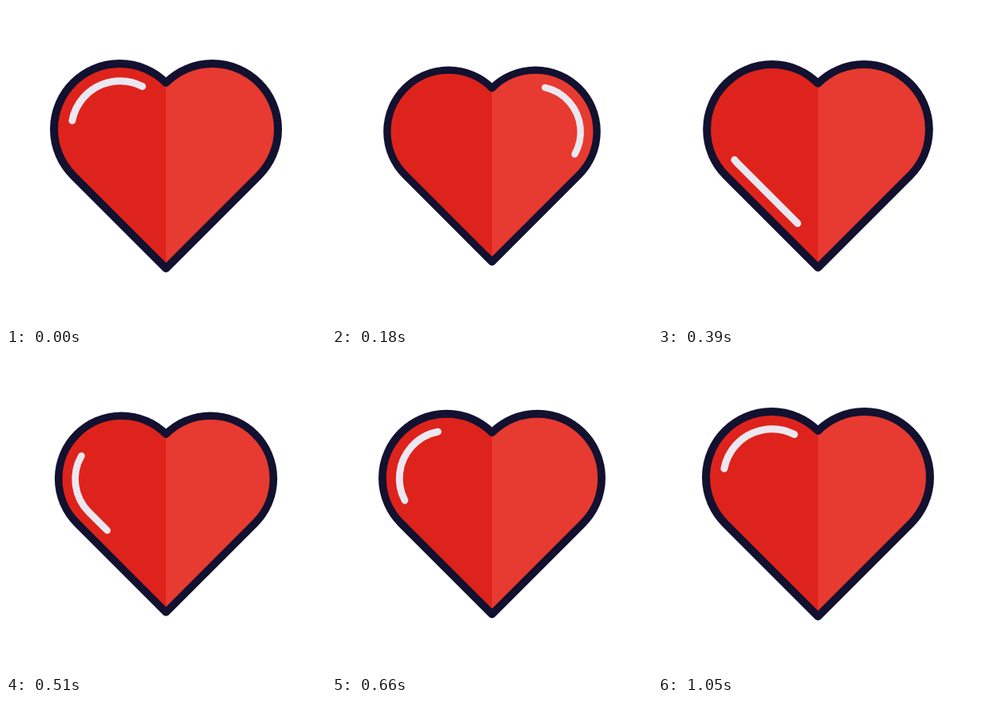
Write an HTML page that moves like this. It is 400x400 px and loops after 2260 ms.

```html
<!DOCTYPE html>
<html lang="en">
<head>
<meta charset="utf-8">
<title>Beating heart</title>
<style>
  html, body { margin: 0; height: 100%; overflow: hidden; background: #fff; }
  svg { display: block; width: 100%; height: 100%; }
  path { stroke-linejoin: round; stroke-linecap: round; }
</style>
</head>
<body>
<svg viewBox="0 0 400 400">
  <g id="heart">
    <path fill="#de231c" d="M200 96A82 82 0 0 0 84 212L200 328Z"/>
    <path fill="#e73a30" d="M200 96A82 82 0 0 1 316 212L200 328Z"/>
    <path fill="none" stroke="#12112f" stroke-width="10"
      d="M200 96A82 82 0 0 0 84 212L200 328L316 212A82 82 0 0 0 200 96Z"/>
    <path id="shine" fill="none" stroke="#ece7f0" stroke-width="9" pathLength="1" stroke-dasharray=".161 .839"
      d="M200 298L99.5 197.5A60.8 60.8 0 0 1 179.4 106.2L200 122.5L220.6 106.2A60.8 60.8 0 0 1 300.5 197.5Z"/>
  </g>
</svg>
<script>
const LOOP = 2260, STEP = 30, MOVE_END = 1050, SHINE_TIME = 1035, SHINE_START = 0.2865;
const BEATS = [[0, 1], [270, 0.915], [420, 1], [570, 0.938], [720, 1]]; // [ms, scale]
const heart = document.getElementById('heart');
const shine = document.getElementById('shine');

function beatScale(t) {
  const next = BEATS.findIndex(([time]) => time > t);
  if (next < 0) return 1;
  const [t0, from] = BEATS[next - 1], [t1, to] = BEATS[next];
  const eased = (1 - Math.cos(Math.PI * (t - t0) / (t1 - t0))) / 2;
  return from + (to - from) * eased;
}

// cubic-bezier(.27, 0, 0, 1), solved by bisection
function shineEase(x) {
  if (x >= 1) return 1;
  let low = 0, high = 1;
  for (let i = 0; i < 30; i++) {
    const v = (low + high) / 2;
    if (0.81 * v * (1 - v) ** 2 + v ** 3 < x) low = v; else high = v;
  }
  return low * low * (3 - 2 * low);
}

function draw(now) {
  const t = Math.min(Math.floor(now % LOOP / STEP) * STEP, MOVE_END);
  heart.setAttribute('transform', `translate(200 200) scale(${beatScale(t)}) translate(-200 -200)`);
  const start = (SHINE_START + shineEase(t / SHINE_TIME)) % 1;
  shine.setAttribute('stroke-dashoffset', 1 - start);
}

const began = performance.now();
function tick() {
  draw(performance.now() - began);
  requestAnimationFrame(tick);
}
tick();
</script>
</body>
</html>
```
